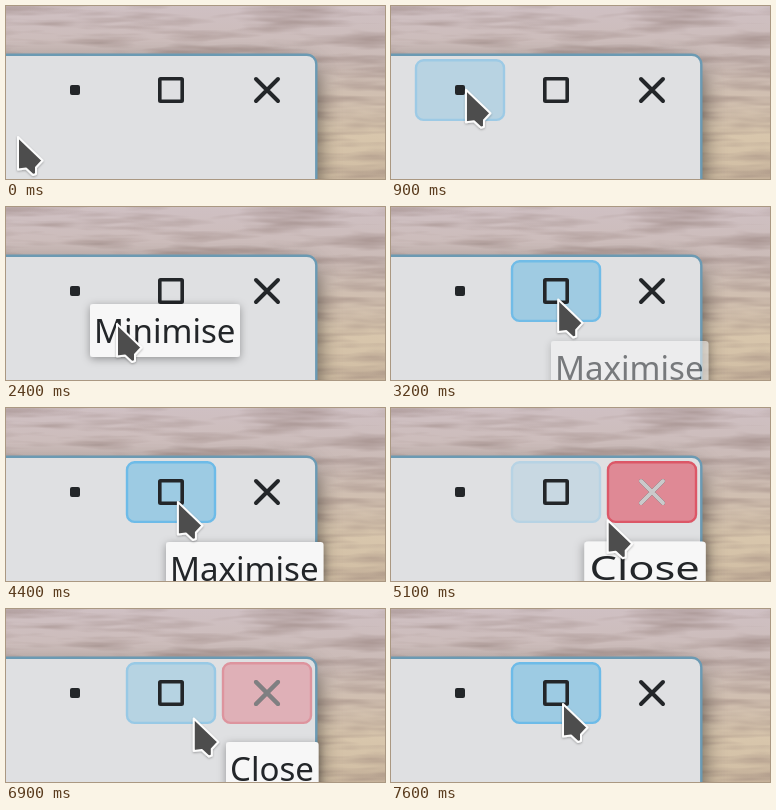
Recreate the animation shown at these times as an HTML page. Size 379 by 173 pixels, loop 8 s.

```html
<!DOCTYPE html>
<html lang="en">
<head>
<meta charset="utf-8">
<title>Window buttons with tooltips</title>
<style>
  html, body { margin: 0; width: 379px; height: 173px; overflow: hidden; }
  svg { display: block; }
  text { font: 33.1px "Noto Sans", "Open Sans", sans-serif; fill: #232629; }
</style>
</head>
<body>
<svg width="379" height="173" viewBox="0 0 379 173">
  <defs>
    <linearGradient id="sky" x1="0" y1="0" x2="0" y2="1">
      <stop offset="0" stop-color="#cfc0c3"/>
      <stop offset=".3" stop-color="#cbbbb7"/>
      <stop offset=".5" stop-color="#d0bfb1"/>
      <stop offset=".75" stop-color="#d8c6ac"/>
      <stop offset="1" stop-color="#d0bda3"/>
    </linearGradient>
    <filter id="streaks" x="0" y="0" width="100%" height="100%" color-interpolation-filters="sRGB">
      <feTurbulence type="fractalNoise" baseFrequency=".012 .1" numOctaves="3" seed="4"/>
      <feColorMatrix values="0 0 0 0 .54  0 0 0 0 .45  0 0 0 0 .43  1 0 0 0 -.4"/>
    </filter>
    <filter id="depth" x="-20%" y="-30%" width="140%" height="160%"><feGaussianBlur stdDeviation="12"/></filter>
    <filter id="tipShadow" x="-20%" y="-50%" width="140%" height="200%">
      <feDropShadow dx="0" dy="2" stdDeviation="4" flood-opacity=".35"/>
    </filter>
    <filter id="cursorShadow" x="-40%" y="-30%" width="180%" height="160%">
      <feDropShadow dx="0" dy="1" stdDeviation="1" flood-opacity=".3"/>
    </filter>
  </defs>

  <rect width="379" height="173" fill="url(#sky)"/>
  <rect width="379" height="173" filter="url(#streaks)"/>

  <rect x="-80" y="60" width="390" height="220" rx="10" opacity=".6" filter="url(#depth)"/>
  <rect x="-20" y="48.7" width="330.3" height="180" rx="9.5" fill="#dfe0e2" stroke="#6b9ab3" stroke-width="2.4"/>

  <g id="hovers" stroke-width="2.4"></g>
  <rect x="64" y="79" width="10" height="10" rx="2" fill="#232629"/>
  <rect x="153.8" y="72.8" width="22.4" height="22.4" rx=".7" fill="none" stroke="#232629" stroke-width="3.6"/>
  <g fill="none" stroke-width="4" stroke-linecap="round">
    <path d="M250 73l22 22m0-22l-22 22" stroke="#232629"/>
    <path id="closeLit" d="M250 73l22 22m0-22l-22 22" stroke="#fcfcfc"/>
  </g>

  <g id="tips"></g>
  <path id="cursor" d="M0 0V32.5L8 31.5L15 38L18 37V30.5L24.5 23.5Z" fill="#4d4d4d" stroke="#fcfcfc"
    stroke-width="2" stroke-linejoin="round" filter="url(#cursorShadow)"/>
</svg>

<script>
const LOOP = 8000, TICK = 100;
const SVG = "http://www.w3.org/2000/svg";
const byId = id => document.getElementById(id);
const lerp = (a, b, p) => a + (b - a) * p;
const ramp = (t, start, duration) => Math.min(1, Math.max(0, (t - start) / duration));
const smooth = p => p * p * (3 - 2 * p);
const easeOut = p => 1 - (1 - p) ** 2;

function add(parent, tag, attrs) {
  const node = document.createElementNS(SVG, tag);
  for (const key in attrs) node.setAttribute(key, attrs[key]);
  return parent.appendChild(node);
}

// Each move eases the cursor on to its next resting place; sag bows the path down.
const home = { x: 12, y: 131 };
const moves = [
  { start: 400, end: 1000, x: 80, y: 80 },
  { start: 2000, end: 2400, x: 111, y: 117 },
  { start: 2700, end: 2800, x: 136, y: 117 },
  { start: 2900, end: 3250, x: 169, y: 91 },
  { start: 4300, end: 4800, x: 197, y: 120 },
  { start: 4900, end: 5500, x: 273, y: 90 },
  { start: 6300, end: 7100, x: 172, y: 95, sag: 29 }
];

function cursorAt(t) {
  let { x, y } = home;
  for (const move of moves) {
    const p = smooth(ramp(t, move.start, move.end - move.start));
    x = lerp(x, move.x, p);
    y = lerp(y, move.y, p) + 4 * (move.sag || 0) * p * (1 - p);
  }
  return { x, y };
}

const FADE = 260;
const blue = { fill: "#9dcbe3", stroke: "#6dbbe8" };
const red = { fill: "#e0707f", stroke: "#dc2f43" };
const buttons = [
  { look: blue, enter: [750], leave: [2050] },
  { look: blue, enter: [2950, 6740], leave: [4930] },
  { look: red, enter: [4900], leave: [6750] }
];
buttons.forEach((button, i) => {
  button.node = add(byId("hovers"), "rect",
    { x: 25 + 96 * i, y: 54.3, width: 88, height: 59.6, rx: 7.5, ...button.look });
});

function hoverAt({ enter, leave }, t) {
  const total = times => times.reduce((sum, start) => sum + ramp(t, start, FADE), 0);
  return total(enter) - total(leave);
}

function makeTip(label, x, y, width) {
  const node = add(byId("tips"), "g", {});
  add(node, "rect", { width, height: 53, rx: 3, fill: "#f7f7f7", filter: "url(#tipShadow)" });
  add(node, "text", { x: 4, y: 39 }).textContent = label;
  return { node, x, y, width };
}
const minimise = makeTip("Minimise", 84, 97, 150);
const maximise = makeTip("Maximise", 160, 134, 157.5);
const close = makeTip("Close", 220, 133, 92.6);

function placeTip(tip, opacity, { x, y, width } = tip) {
  tip.node.setAttribute("transform", `translate(${x} ${y}) scale(${width / tip.width} 1)`);
  tip.node.setAttribute("opacity", opacity);
}

function draw(t) {
  const { x, y } = cursorAt(t);
  byId("cursor").setAttribute("transform", `translate(${x} ${y})`);

  for (const button of buttons) button.node.setAttribute("opacity", hoverAt(button, t));
  byId("closeLit").setAttribute("opacity", hoverAt(buttons[2], t));

  // The second tooltip stretches into the third while they cross-fade.
  const m = easeOut(ramp(t, 4900, 600));
  const box = {
    x: lerp(maximise.x, close.x, m),
    y: lerp(maximise.y, close.y, m),
    width: lerp(maximise.width, close.width, m)
  };
  placeTip(minimise, t >= 1900 && t < 2800 ? 1 : 0);
  placeTip(maximise, m < .5 ? ramp(t, 2980, 400) : 0, box);
  placeTip(close, Math.min(1, 2 * m) * (1 - easeOut(ramp(t, 6900, 700))), box);
}

const start = performance.now();
function frame() {
  const t = (performance.now() - start) % LOOP;
  draw(Math.floor(t / TICK) * TICK);
  requestAnimationFrame(frame);
}
frame();
</script>
</body>
</html>
```
